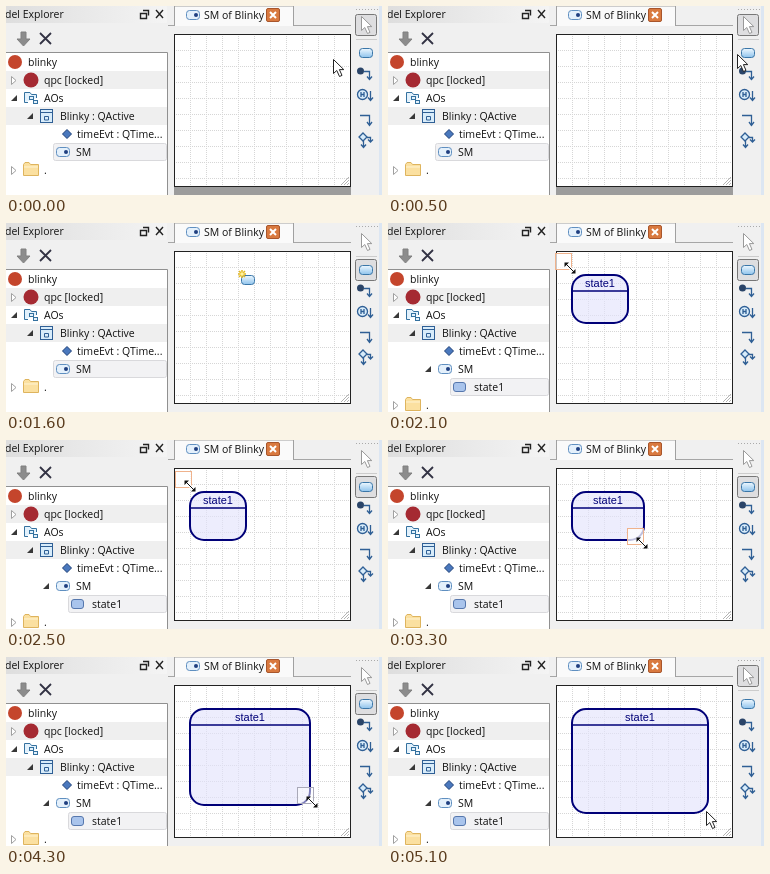
Animation of 376 by 189 pixels, one loop 8 s. Source, as an HTML page:

```html
<!DOCTYPE html>
<html>
<head>
<meta charset="utf-8">
<style>
  html, body { margin: 0; width: 100%; height: 100%; overflow: hidden; background: #f0f0f0; }
  svg { display: block; width: 376px; height: 189px; }
  text { font: 10.5px "Open Sans", "Noto Sans", sans-serif; fill: #111; }
  .title { font: 11px "Liberation Sans", Arial, sans-serif; fill: #000078; text-anchor: middle; }
</style>
</head>
<body>
<svg viewBox="0 0 376 189">
  <defs>
    <linearGradient id="blue" x2="0" y2="1"><stop stop-color="#eef8ff"/><stop offset="1" stop-color="#8fc3ec"/></linearGradient>
    <linearGradient id="bar"><stop stop-color="#dedede"/><stop offset="1" stop-color="#f4f4f4"/></linearGradient>
    <pattern id="grid" x="168" y="28" width="16" height="16" patternUnits="userSpaceOnUse">
      <path d="M.5 0V16M0 .5H16" stroke="#d6d6d6" stroke-dasharray="1 1"/>
    </pattern>
    <rect id="box" x=".5" y=".5" width="13" height="9" rx="3" fill="url(#blue)" stroke="#3a76a8"/>
    <g id="machine">
      <rect x=".5" y=".5" width="13" height="9" rx="3" fill="#e4f0fb" stroke="#5f8fc0"/>
      <circle cx="10" cy="5" r="2" fill="#1f3f80"/>
    </g>
    <path id="closed" d="M.5 .5L5 4.5L.5 8.5Z" fill="#fff" stroke="#a0a0a0"/>
    <path id="open" d="M6 0V6H0Z" fill="#383838"/>
    <path id="pointer" d="M.5 .5V14.5L3.8 11.5L6.5 17.5L9 16.4L6.4 10.6H10.8Z"/>
    <g id="folder"><path d="M.5 13.5V2.500L2 .5H6L7.500 2.500H15.500V13.500Z" fill="#fbe0a0" stroke="#deb45e"/><path d="M1 5H15" stroke="#fff4d4"/></g>
  </defs>

  <!-- explorer -->
  <rect width="161" height="17" fill="url(#bar)"/>
  <text x="-1" y="12">del Explorer</text>
  <path d="M134.500 7.500H140.500V12.500H134.500ZM137 4.500H142.500V9.500M150 4L157 12M157 4L150 12" fill="none" stroke="#222" stroke-width="1.400"/>
  <path d="M15 26H20V33H24L17.500 40L11 33H15Z" fill="#8c8c8c" stroke="#808080"/>
  <path d="M34 27L45 38M45 27L34 38" stroke="#333344" stroke-width="1.800"/>
  <rect y="47" width="161" height="142" fill="#fff"/>
  <path d="M0 74H161M0 110H161" stroke="#efefef" stroke-width="18"/>
  <rect id="selection" y="137.500" height="17" rx="2" fill="#f2f2f4" stroke="#d9d9dc"/>
  <path d="M0 46.500H161.500V189" fill="none" stroke="#909090"/>

  <circle cx="9" cy="56" r="7" fill="#c4452c"/><text x="22" y="60">blinky</text>
  <use href="#closed" x="5" y="70"/><circle cx="25" cy="74" r="7.500" fill="#a52a32"/><text x="38" y="78">qpc [locked]</text>
  <use href="#open" x="5" y="89"/>
  <g fill="#e2f1fc" stroke="#34719f"><path d="M18.500 96.500V86.500H24L25.500 88.500H30.500V92M18.500 96.500H22"/><rect x="23.500" y="90.500" width="4" height="3"/><rect x="27.500" y="94.500" width="4" height="3"/></g>
  <text x="38" y="96">AOs</text>
  <use href="#open" x="21" y="107"/>
  <g fill="#d8ecfa" stroke="#2f5f95"><rect x="34.500" y="103.500" width="12" height="13"/><path d="M35 106.500H46M38.500 110.500H42.500V114H38.500Z"/></g>
  <text x="54" y="114">Blinky : QActive</text>
  <path d="M61 123.500L65.500 128L61 132.500L56.500 128Z" fill="#4a78bd" stroke="#1c3f78"/><text x="71" y="132">timeEvt : QTime...</text>
  <use id="smOpen" href="#open" x="37" y="143"/><use href="#machine" x="50" y="141"/><text x="70" y="150">SM</text>
  <g id="child"><rect x="65.500" y="159.500" width="12" height="9" rx="2.500" fill="#a9c4ec" stroke="#5677ad"/><text x="86" y="168">state1</text></g>
  <g id="lastRow"><use href="#closed" x="5" y="160"/><use href="#folder" x="17" y="156"/><text x="38" y="168">.</text></g>

  <!-- diagram -->
  <path d="M162 19.500H345" stroke="#a6a6a6"/>
  <path d="M168.500 20V0H287.500V20" fill="#fafafa" stroke="#a0a0a0"/>
  <use href="#machine" x="180" y="4"/><text x="198" y="13">SM of Blinky</text>
  <rect x="260.500" y="2.500" width="13" height="13" rx="1.500" fill="#d9793f" stroke="#a8562c"/>
  <path d="M264 6L270 12M270 6L264 12" stroke="#fff" stroke-width="2"/>
  <rect id="backdrop" x="168" y="181" width="177" height="8" fill="#9c9c9c"/>
  <rect x="168.500" y="28.500" width="176" height="152" fill="#fff" stroke="#222"/>
  <rect x="169" y="29" width="175" height="151" fill="url(#grid)"/>
  <path d="M335 179L343 171M338 179L343 174M341 179L343 177" stroke="#b4b4b4"/>
  <g id="state" stroke="#000078" stroke-width="2">
    <rect id="body" x="184" y="52" rx="14" fill="#e4e4fc" fill-opacity=".65"/>
    <path id="divider" stroke-width="1.500"/>
    <text id="name" class="title" y="64" stroke="none">state1</text>
  </g>

  <!-- palette -->
  <rect x="373" width="3" height="189" fill="#dce6f2"/>
  <path d="M350 3.500H372" stroke="#aaa" stroke-dasharray="1 2"/>
  <rect id="arrowButton" x="349.500" y="8.500" width="21" height="21" rx="2"/>
  <rect id="stateButton" x="349.500" y="36.500" width="21" height="21" rx="2"/>
  <use href="#pointer" transform="translate(355 10)" fill="#fff" stroke="#999"/>
  <path d="M350 33.500H371" stroke="#ccc"/>
  <use href="#box" x="353" y="42"/>
  <g fill="none" stroke="#2f5f95" stroke-width="1.300">
    <circle cx="354.500" cy="65" r="3.500" fill="#2a4468" stroke="none"/><path d="M358 65.500H363.500V73M361 70.500L363.500 73.500L366 70.500"/>
    <circle cx="356.500" cy="88.500" r="5" fill="#d8ecfa"/><path d="M355 86V91M358 86V91M355 88.500H358M364.500 85V94M362 91.500L364.500 94.500L367 91.500"/>
    <path d="M354 109.500H363.500V119M361 116L363.500 119.500L366 116"/>
    <path d="M357 127L361 131L357 135L353 131Z" fill="#d8ecfa"/><path d="M361 131.500H364.500V135M357.500 135V141M355 138.500L357.500 141.500L360 138.500M362 133.500L364.500 136L367 133.500"/>
  </g>

  <!-- cursors -->
  <rect id="handle" width="16" height="16" fill="#fff"/>
  <use id="arrowCursor" href="#pointer" fill="#fff" stroke="#222"/>
  <g id="placeCursor">
    <use href="#box"/>
    <path d="M1 -5V3M-3 -1H5M-2 -4L4 2M4 -4L-2 2" stroke="#e3b820" stroke-width="1.500"/><circle cx="1" cy="-1" r="1.800" fill="#fff3a0"/>
  </g>
  <g id="sizeCursor">
    <path d="M-5 -5L5 5" stroke="#fff" stroke-width="3"/>
    <path d="M-4 -4L4 4" stroke="#111"/><path d="M-5.500 -5.500H-1L-5.500 -1ZM5.500 5.500H1L5.500 1Z" fill="#111"/>
  </g>
</svg>
<script>
const LOOP = 8000, CLICK = 1000, PLACED = 2100, DONE = 5100;
// [time, x, y] of the pointer's hot spot
const path = [
  [0, 327, 53], [700, 358, 46], [1000, 358, 46], [1600, 235, 52], [1800, 198, 46],
  [1900, 179, 40], [2000, 174, 37], [2100, 182, 45], [2500, 184, 46], [2700, 188, 54],
  [3300, 254, 103], [3800, 284, 130], [4500, 315, 151], [4600, 317, 153],
  [5000, 317, 153], [5100, 318, 154], [LOOP, 318, 154]
];
const $ = id => document.getElementById(id);
const set = (id, attrs) => { for (const key in attrs) $(id).setAttribute(key, attrs[key]); };
const show = (id, on) => set(id, { visibility: on ? 'visible' : 'hidden' });
const move = (id, x, y) => set(id, { transform: `translate(${x} ${y})` });
const snap = (length, least) => Math.max(least, Math.round(length / 8) * 8);

function pointerAt(t) {
  const i = path.findIndex(point => point[0] > t);
  const [t0, x0, y0] = path[i - 1], [t1, x1, y1] = path[i];
  const k = (t - t0) / (t1 - t0);
  return [Math.round(x0 + (x1 - x0) * k), Math.round(y0 + (y1 - y0) * k)];
}

function button(id, level) {
  set(id, {
    fill: ['none', '#f7f7f7', '#dedee0'][level],
    stroke: ['none', '#b5b5b5', '#777'][level]
  });
}

function draw(t) {
  const [x, y] = pointerAt(t);
  const placed = t >= PLACED, done = t >= DONE;
  const placing = t > CLICK && !placed && x < 345, sizing = placed && !done;

  show('child', placed);
  show('smOpen', placed);
  show('state', placed);
  show('backdrop', t <= CLICK);
  move('lastRow', 0, placed ? 18 : 0);
  set('selection', placed ? { x: 62.5, y: 155.5, width: 98 } : { x: 47.5, y: 137.5, width: 113 });

  const w = done ? 136 : snap(x - 183, 56);
  const h = done ? 104 : snap(y - 53, 48);
  set('body', { width: w, height: h });
  set('divider', { d: `M184 68H${184 + w}` });
  set('name', { x: 184 + w / 2 });

  button('arrowButton', t <= CLICK || done ? 2 : 0);
  button('stateButton', done ? 0 : t >= CLICK ? 2 : t >= 600 ? 1 : 0);

  const small = t < 3500;
  set('handle', {
    x: x - 14.5, y: y - 14.5,
    stroke: small ? '#efb28c' : '#a9a9b8', 'fill-opacity': small ? .75 : .5
  });
  show('handle', sizing);
  show('arrowCursor', !placing && !sizing);
  show('placeCursor', placing);
  show('sizeCursor', sizing);
  for (const id of ['arrowCursor', 'placeCursor', 'sizeCursor']) move(id, x, y);
}

function frame() {
  draw(Math.floor(performance.now() % LOOP / 100) * 100);
  requestAnimationFrame(frame);
}
frame();
</script>
</body>
</html>
```
